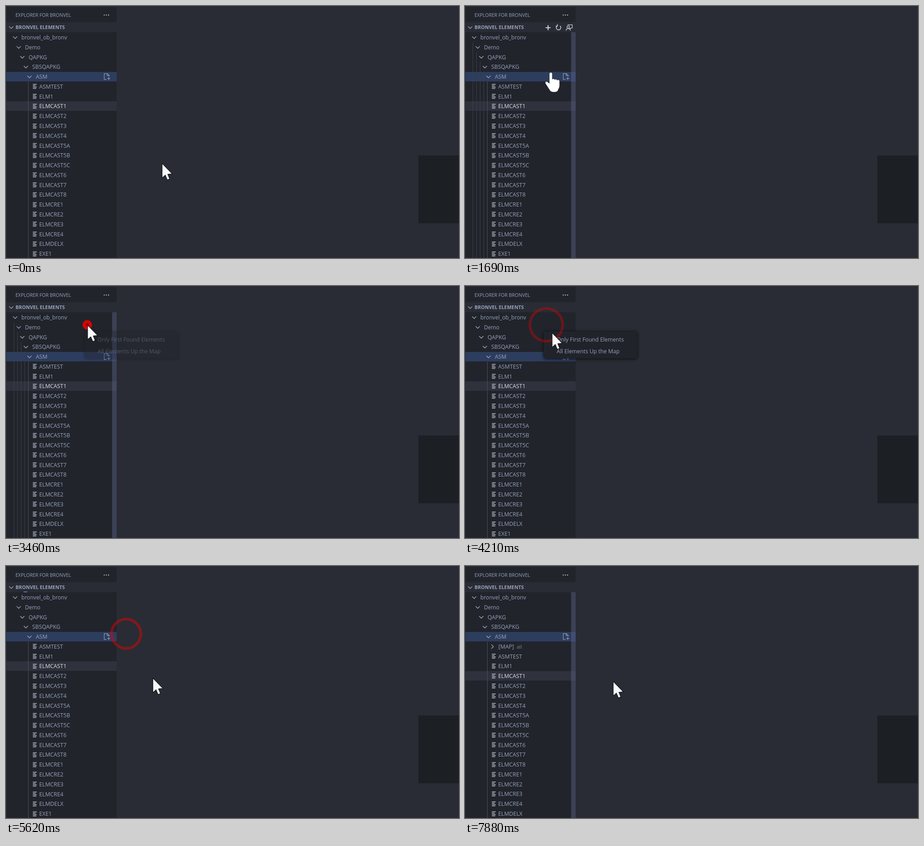
These frames come from a looping animation (1003x558 px, 8 s). An HTML page:

```html
<!DOCTYPE html>
<html lang="en">
<head>
<meta charset="utf-8">
<title>Element tree</title>
<style>
  html, body { margin: 0; width: 100%; height: 100%; overflow: hidden; background: #292c34; }
  svg { display: block; width: 1003px; height: 558px; }
  text { font: 12.3px "Open Sans", "Noto Sans", sans-serif; fill: #96a2ba; }
  .line { fill: none; stroke: #a9b1c2; stroke-width: 1.25; }
</style>
</head>
<body>
<svg id="stage" viewBox="0 0 1003 558" xmlns="http://www.w3.org/2000/svg">
  <rect width="1003" height="558" fill="#292c34"/>
  <rect x="913" y="331" width="150" height="150" fill="#1c1f24"/>
  <rect x="1" y="2" width="244" height="556" fill="#21242b"/>
  <rect x="1" y="36" width="244" height="22" fill="#292c34"/>
  <text x="21" y="23.8" style="font-size:10.5px">EXPLORER FOR BRONVEL</text>
  <g fill="#b4bac8"><circle cx="217.5" cy="20" r="1.2"/><circle cx="222.3" cy="20" r="1.2"/><circle cx="227.1" cy="20" r="1.2"/></g>
  <text x="21" y="51.3" style="font-size:10.8px;font-weight:700">BRONVEL ELEMENTS</text>

  <g id="tools" class="line" style="stroke:#ccd0d9">
    <path d="M178.5 48H189.5M184 42.5V53.5" stroke-width="2.2"/>
    <path d="M210.5 44.2A5 5 0 1 1 204.5 43.6M204.6 40.6V44.6H200.9" stroke-width="1.6"/>
    <path d="M227 41.5H237.5V48.5H235L232.5 51V48.5"/>
    <circle cx="228.5" cy="46.5" r="2.7"/>
    <path d="M223.5 54.5C224 48.5 233 48.5 233.5 54.5"/>
  </g>

  <g id="tree"></g>
  <path id="guides" class="line" d="M17.5 80V558M25.5 102V558M33.5 124V558M41.5 145V558" style="stroke:#3b404c;stroke-width:1"/>
  <path d="M49.5 167V558" class="line" style="stroke:#4b505d;stroke-width:1"/>
  <path class="line" d="M222.5 162.5H217.5V149.5H224.5L228.5 153.5V156M224 149.5V154H228.5M227.5 157V164M224 160.5H231" style="stroke:#8e9ab5"/>
  <rect id="scrollbar" x="235" y="58" width="10" height="500" fill="#5a6388" fill-opacity=".46"/>
  <path id="spinner" class="line" d="M-5.3 -3.7A6.5 6.5 0 0 1 6.5 0" stroke-width="1.5"/>
  <rect id="progress" y="56.3" height="2" fill="#4d78cc"/>

  <g id="menu">
    <rect x="174" y="100.5" width="207.5" height="60" rx="5" fill="#20232a" style="filter:drop-shadow(0 1px 3px rgba(0,0,0,.8))"/>
    <rect id="choice" x="178" width="199" height="25" rx="4" fill="#2d3d5e"/>
    <text x="203" y="123.3" style="font-size:12.2px">Only First Found Elements</text>
    <text x="203" y="149.3" style="font-size:12.2px">All Elements Up the Map</text>
  </g>

  <circle id="ring" fill="none" stroke="#e60000" stroke-width="6"/>
  <g id="cursor">
    <path id="arrow" d="M.7 .7V32.8L7.7 26.4L12.2 37L17.4 34.8L13.2 24.5L23 23.5Z" fill="#fafafa" stroke="#101216" stroke-width="1.2"/>
    <path id="hand" d="M-3.2 2.5a3.2 3.2 0 0 1 6.6 0V14.5a3 3 0 0 1 5.4 1a3 3 0 0 1 5.4 1.2a3 3 0 0 1 5.4 2V28c0 5-2 7-3 9.5c-1 4-4 5.5-9 5.5s-8-1-10-4.5L-11.5 24.5c-2-4 1-6 4-4.5L-3.2 23.5z" fill="#fff" stroke="#16181d" stroke-width=".7"/>
  </g>
</svg>
<script>
const LOOP = 8000, PITCH = 21.77, FIRST_ROW = 69.6;
const NS = "http://www.w3.org/2000/svg";
const $ = id => document.getElementById(id);
const rowY = i => FIRST_ROW + i * PITCH;
const ramp = (t, a, b) => Math.min(1, Math.max(0, (t - a) / (b - a)));
const show = (id, amount) => $(id).setAttribute("opacity", Number(amount));

function add(parent, tag, attrs, content = "") {
  const el = document.createElementNS(NS, tag);
  for (const key in attrs) el.setAttribute(key, attrs[key]);
  el.textContent = content;
  parent.appendChild(el);
  return el;
}
const label = (parent, x, y, content, style = "") =>
  add(parent, "text", { x, y: y + 4.5, style }, content);
const chevron = (parent, x, y, turn = 0) => add(parent, "path", {
  d: "M-4.6 -2.2L0 2.4L4.6 -2.2", class: "line", transform: `translate(${x} ${y}) rotate(${turn})`
});
const band = (parent, y, fill) =>
  add(parent, "rect", { x: 1, y: Math.round(y - 11), width: 244, height: 21, fill });

const tree = $("tree");
chevron(tree, 11.5, 47.5);
band(tree, rowY(4), "#2d3d5e");
const folderChevrons = ["bronvel_ob_bronv", "Demo", "QAPKG", "SBSQAPKG", "ASM"].map((name, i) => {
  label(tree, 34 + 8 * i, rowY(i), name, i < 2 ? "font-size:12.1px" : "");
  return chevron(tree, 20.3 + 7.9 * i, rowY(i));
});

const mapRow = add(tree, "g", {});
chevron(mapRow, 60.5, rowY(5), -90);
label(mapRow, 74, rowY(5), "[MAP]");
label(mapRow, 114.5, rowY(5), "all", "font-size:11px;opacity:.75");

const leaves = add(tree, "g", {});
const names = ["ASMTEST", "ELM1",
  ..."1 2 3 4 5A 5B 5C 6 7 8".split(" ").map(n => "ELMCAST" + n),
  ...[1, 2, 3, 4].map(n => "ELMCRE" + n), "ELMDELX", "EXE1"];
names.forEach((name, i) => {
  const y = rowY(i + 5), selected = name === "ELMCAST1";
  if (selected) band(leaves, y, "#2f323d");
  add(leaves, "path", {
    d: `M59.5 ${Math.round(y) - 4.5}h8.5m-8.5 3h6m-6 3h8.5m-8.5 3h7.5`, class: "line", style: "stroke:#b9bfcb;stroke-width:1.4"
  });
  label(leaves, 73.5, y, name, selected ? "fill:#dde0e6" : "");
});

// time, x, y, easing into the point
const linear = u => u;
const easeOut = u => Math.sin(u * Math.PI / 2);
const smooth = u => u * u * (3 - 2 * u);
const route = [
  [1160, 345, 348, linear], [1690, 190, 148, smooth], [1990, 167, 93, easeOut],
  [2390, 179, 82, smooth], [2460, 179, 82, linear], [2530, 180, 86, linear],
  [4070, 180, 86, linear], [4210, 192, 103, linear], [4500, 255, 151, linear],
  [4600, 265, 157, easeOut], [4680, 266, 150, linear], [5000, 266, 150, linear],
  [5620, 324.5, 247.5, smooth], [5760, 327.5, 255, easeOut]
];
function cursorAt(t) {
  const next = route.findIndex(point => point[0] > t);
  if (next === 0) return route[0].slice(1, 3);
  if (next < 0) return route[route.length - 1].slice(1, 3);
  const [t0, x0, y0] = route[next - 1], [t1, x1, y1, ease] = route[next];
  const u = ease(ramp(t, t0, t1));
  return [x0 + (x1 - x0) * u, y0 + (y1 - y0) * u];
}

const OPEN = 3320, PICK = 4830, BUSY = 5217, DONE = 7610;
const clicks = [[OPEN, 180, 86], [PICK, 266, 150]];

function drawRing(t) {
  const click = clicks.find(([start]) => t >= start && t < start + 1200);
  show("ring", 0);
  if (!click) return;
  const [start, x, y] = click, age = t - start, ring = $("ring");
  ring.setAttribute("cx", x);
  ring.setAttribute("cy", y);
  ring.setAttribute("r", 2 + age * .0385);
  ring.setAttribute("fill", age < 250 ? "#a00810" : "none");
  show("ring", 1 - (age / 1200) ** 1.5);
}

function drawProgress(t) {
  const busy = t >= BUSY && t < DONE, unit = 4.88;
  const p = (t - BUSY) / 2487 % 1;
  const shift = p < .5 ? 50 * p : 25 + 49 * (p - .5);
  const width = unit * (3 - 4 * Math.abs(p - .5));
  show("progress", busy);
  if (busy) {
    $("progress").setAttribute("width", width);
    $("progress").setAttribute("x", 1 + unit * (shift + .5) - width / 2);
  }
  const loading = t >= 5720 && t < DONE;
  show("spinner", loading);
  folderChevrons[1].setAttribute("opacity", loading ? 0 : 1);
  $("spinner").setAttribute("transform", `translate(28.5 90.7) rotate(${(t - 7050) / 930 * 360})`);
}

function render(t) {
  const [x, y] = cursorAt(t);
  const inTree = t < OPEN && x < 245;
  const inMenu = t > 4210 && t < PICK && y > 105;
  const pointing = inTree || inMenu;
  $("cursor").setAttribute("transform", `translate(${x} ${y})`);
  show("arrow", !pointing);
  show("hand", pointing);

  const hover = ramp(t, 1480, 1620) * (1 - ramp(t, 3560, 3950));
  show("tools", inTree);
  show("guides", hover);
  show("scrollbar", Math.max(hover, ramp(t, DONE, DONE + 100)));

  show("menu", t < PICK ? ramp(t, 3400, 3570) : 0);
  show("choice", inMenu);
  $("choice").setAttribute("y", y < 131.5 ? 106 : 132);

  const done = t >= DONE;
  mapRow.setAttribute("opacity", done ? 1 : 0);
  leaves.setAttribute("transform", `translate(0 ${done ? PITCH : 0})`);
  drawProgress(t);
  drawRing(t);
}

const begin = performance.now();
function tick() {
  render((performance.now() - begin) % LOOP);
  requestAnimationFrame(tick);
}
tick();
</script>
</body>
</html>
```
